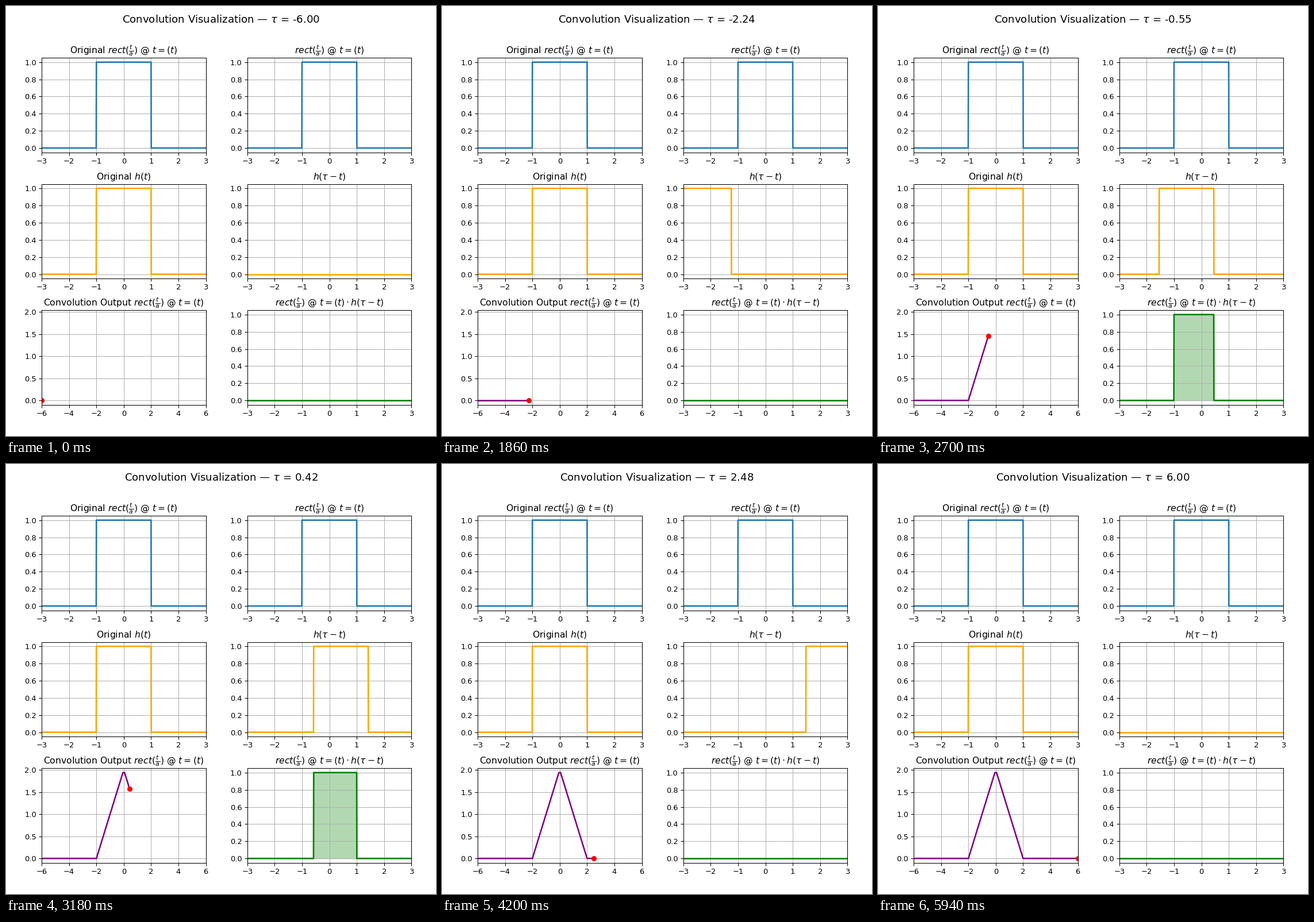
A matplotlib script for the animation above (6 s loop, 748x748 px).

```python
import numpy as np
import matplotlib.pyplot as plt
from matplotlib.animation import FuncAnimation

SIZE = 748
FRAMES = 100
INTERVAL = 60

# Panel layout in pixels, measured from the top left corner
LEFTS = (62.1, 419.8)
TOPS = (90.2, 309.75, 529.3)
WIDTH, HEIGHT = 285.4, 164.3

RECT = r"rect(\frac{t}{a})$ @ $t=(t)"

t = np.linspace(-3, 3, 1000)
taus = np.linspace(-6, 6, FRAMES)


def rect(x):
    return np.where(np.abs(x) <= 1, 1.0, 0.0)


output = np.maximum(0, 2 - np.abs(taus))

plt.rcParams["font.family"] = "DejaVu Sans"
fig = plt.figure(figsize=(8, 8), dpi=SIZE / 8)


def panel(row, col, title, half_width=3, peak=1.0):
    bottom = SIZE - TOPS[row] - HEIGHT
    box = np.array([LEFTS[col], bottom, WIDTH, HEIGHT]) / SIZE
    ax = fig.add_axes(box)
    ax.set_title(title)
    ax.set_xlim(-half_width, half_width)
    ax.set_ylim(-0.05 * peak, 1.05 * peak)
    ax.grid(True)
    return ax


signal_ax = panel(0, 0, f"Original ${RECT}$")
fixed_ax = panel(0, 1, f"${RECT}$")
kernel_ax = panel(1, 0, "Original $h(t)$")
shifted_ax = panel(1, 1, r"$h(\tau - t)$")
output_ax = panel(2, 0, f"Convolution Output ${RECT}$", 6, output.max())
product_ax = panel(2, 1, rf"${RECT} \cdot h(\tau - t)$")

for ax, color in ((signal_ax, "C0"), (fixed_ax, "C0"), (kernel_ax, "orange")):
    ax.plot(t, rect(t), color=color, lw=2)

shifted_line, = shifted_ax.plot([], [], color="orange", lw=2)
product_line, = product_ax.plot([], [], color="green", lw=2)
area = product_ax.fill_between(t, 0 * t, color="green", alpha=0.3)
output_line, = output_ax.plot([], [], color="purple", lw=2)
dot, = output_ax.plot([], [], "ro")
heading = fig.suptitle("", fontsize=14, y=0.98)


def update(i):
    tau = taus[i]
    shifted = rect(tau - t)
    product = rect(t) * shifted

    shifted_line.set_data(t, shifted)
    product_line.set_data(t, product)
    outline = np.column_stack([t, product])
    area.set_verts([np.vstack([[t[0], 0], outline, [t[-1], 0]])])

    output_line.set_data(taus[:i + 1], output[:i + 1])
    dot.set_data([tau], [output[i]])
    heading.set_text(rf"Convolution Visualization — $\tau$ = {tau:.2f}")
    return shifted_line, product_line, area, output_line, dot, heading


anim = FuncAnimation(fig, update, frames=FRAMES, interval=INTERVAL,
                     repeat=True, repeat_delay=0)
plt.show()
```
